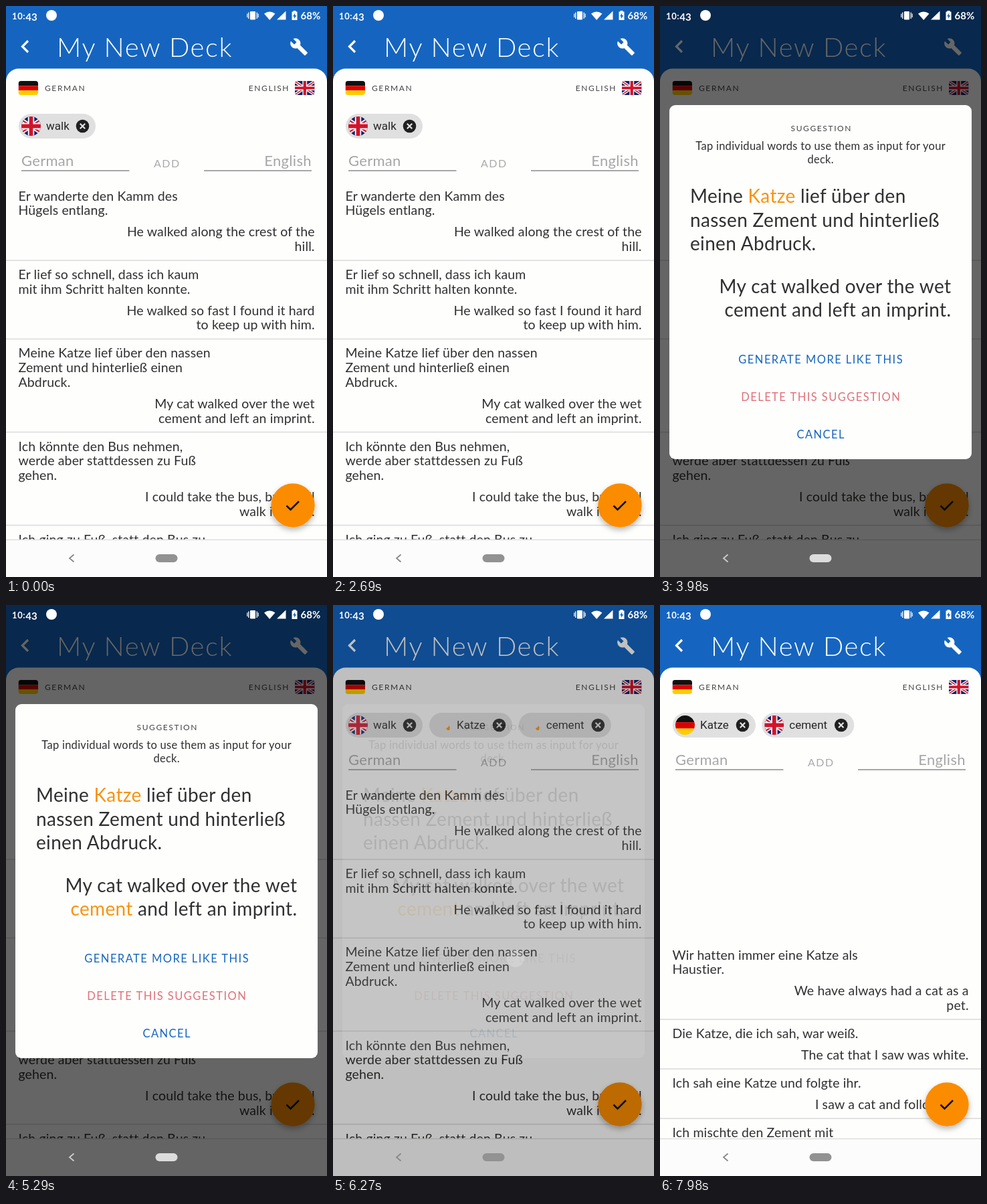
An HTML page for the animation above (8000 ms loop, 480x853 px).

```html
<!DOCTYPE html>
<html lang="en">
<head>
<meta charset="utf-8">
<title>Deck suggestions</title>
<style>
html, body { margin: 0; width: 100%; height: 100%; overflow: hidden; background: #1565c0; }
svg { display: block; }
#stage { width: 100vw; height: 100vh; }
text { font-family: Lato, "Open Sans", sans-serif; white-space: pre; }
.chip { font-family: Roboto, sans-serif; }
</style>
</head>
<body>
<svg id="stage" viewBox="0 0 480 853" xmlns="http://www.w3.org/2000/svg"></svg>
<script>
const LOOP = 8000;
const BLUE = '#1565c0', ORANGE = '#fb8c00', INK = '#303030', PAPER = '#fefefd';

// ---- drawing helpers ----
// size, letter spacing, weight
const styles = {
  title: [40, 1.6, 300], body: [19.5, 0.14], hint: [22, 0.3], add: [16, 1.5],
  label: [12, 1.6], lead: [16.5, 0.27], big: [28, 0.32], button: [16.5, 1.45]
};

function text(str, x, y, style, fill = INK, anchor = 'start', extra = '') {
  const [size, gap, weight = 400] = styles[style];
  const shift = { start: 0, middle: gap / 2, end: gap }[anchor];
  return `<text x="${x + shift}" y="${y}" font-size="${size}" letter-spacing="${gap}"
    font-weight="${weight}" fill="${fill}" text-anchor="${anchor}" ${extra}>${str}</text>`;
}

const rect = (x, y, w, h, fill, r = 0, extra = '') =>
  `<rect x="${x}" y="${y}" width="${w}" height="${h}" rx="${r}" fill="${fill}" ${extra}/>`;

const line = (d, color, width, extra = '') =>
  `<path d="${d}" fill="none" stroke="${color}" stroke-width="${width}" ${extra}/>`;

const flagArt = {
  de: rect(0, 0, 60, 14, '#111') + rect(0, 14, 60, 13, '#dd0000') + rect(0, 27, 60, 13, '#ffce00'),
  uk: rect(0, 0, 60, 40, '#10246b') +
    line('M0 0L60 40M60 0L0 40', '#fff', 8) + line('M0 0L60 40M60 0L0 40', '#d0142c', 3) +
    line('M30 0V40M0 20H60', '#fff', 13) + line('M30 0V40M0 20H60', '#d0142c', 8)
};

let clips = 0;
function flag(kind, x, y, w, h, r) {
  const id = 'clip' + clips++;
  return `<clipPath id="${id}">${rect(x, y, w, h, '#000', r)}</clipPath>
    <g clip-path="url(#${id})"><svg x="${x}" y="${y}" width="${w}" height="${h}"
    viewBox="0 0 60 40" preserveAspectRatio="xMidYMid slice">${flagArt[kind]}</svg></g>`;
}

function chip(id, kind, word, width) {
  const cx = width - 19.5;
  return `<g id="${id}">${rect(0, 161, width, 37, '#e0e0e0', 18.5)}
    <path id="${id}Spark" d="M25 184l3-1 1-3 2 3-1 4h-3z" fill="${ORANGE}"/>
    <g id="${id}Flag">${flag(kind, 4, 165, 29, 29, 14.5)}</g>
    <text class="chip" x="41" y="185" font-size="17" fill="#262626">${word}</text>
    <circle cx="${cx}" cy="179.5" r="9.8" fill="#202020"/>
    ${line(`M${cx - 3.7} 175.8l7.4 7.4m0-7.4l-7.4 7.4`, '#e6e6e6', 2.1)}</g>`;
}

// Rows stack: left lines, then right lines, then a divider.
function list(rows) {
  const pitch = 21.7;
  let top = 262.6, out = '';
  for (const [left, right] of rows) {
    let y = top + 28;
    left.forEach((s, i) => out += text(s, 18.5, y + i * pitch, 'body'));
    y += (left.length - 1) * pitch + 32;
    right.forEach((s, i) => out += text(s, 461.5, y + i * pitch, 'body', INK, 'end'));
    top += 74 + (left.length + right.length - 2) * pitch;
    out += rect(0, top - 0.8, 480, 1.7, '#dedede');
  }
  return out;
}

const firstRows = [
  [['Er wanderte den Kamm des', 'Hügels entlang.'], ['He walked along the crest of the', 'hill.']],
  [['Er lief so schnell, dass ich kaum', 'mit ihm Schritt halten konnte.'],
   ['He walked so fast I found it hard', 'to keep up with him.']],
  [['Meine Katze lief über den nassen', 'Zement und hinterließ einen', 'Abdruck.'],
   ['My cat walked over the wet', 'cement and left an imprint.']],
  [['Ich könnte den Bus nehmen,', 'werde aber stattdessen zu Fuß', 'gehen.'],
   ['I could take the bus, but I will', 'walk instead.']],
  [['Ich ging zu Fuß, statt den Bus zu', 'nehmen.'], ['I walked instead of taking the bus.']]
];
const nextRows = [
  [['Wir hatten immer eine Katze als', 'Haustier.'], ['We have always had a cat as a', 'pet.']],
  [['Die Katze, die ich sah, war weiß.'], ['The cat that I saw was white.']],
  [['Ich sah eine Katze und folgte ihr.'], ['I saw a cat and followed it.']],
  [['Ich mischte den Zement mit', 'Wasser.'], ['I mixed the cement with water.']]
];

// ---- scene ----
const wrench = 'M22.7 19l-9.1-9.1c.9-2.3.4-5-1.5-6.9-2-2-5-2.4-7.4-1.3L9 6 6 9 1.6 4.7C.4 7.1.9 10.1 2.9 12.1c1.9 1.9 4.6 2.4 6.9 1.5l9.1 9.1c.4.4 1 .4 1.4 0l2.3-2.3c.5-.4.5-1.1.1-1.4z';

const header = rect(0, 0, 480, 853, BLUE) +
  line('M33 52L24.5 60.5L33 69', '#fff', 3.2) +
  text('My New Deck', 76, 76, 'title', '#fff') +
  `<path transform="translate(424 47) scale(1.17)" d="${wrench}" fill="#fff"/>` +
  rect(0, 93.5, 480, 800, PAPER, 19);

const form = flag('de', 18.5, 112, 29.5, 21, 4) + text('GERMAN', 58, 126.5, 'label', '#444') +
  text('ENGLISH', 422.5, 126.5, 'label', '#444', 'end') + flag('uk', 432, 112, 29.5, 21, 4) +
  chip('walk', 'uk', 'walk', 115) + chip('katze', 'de', 'Katze', 124) + chip('cement', 'uk', 'cement', 138) +
  text('German', 23, 238.5, 'hint', '#a6a6a6') + text('English', 456.5, 238.5, 'hint', '#a6a6a6', 'end') +
  rect(23, 245.3, 161.5, 1.4, '#858585') + rect(296, 245.3, 161, 1.4, '#858585') +
  text('ADD', 240, 241, 'add', '#aaa', 'middle');

const fab = `<circle cx="429" cy="746" r="32.7" fill="${ORANGE}" filter="url(#shade)"/>` +
  line('M419.5 746.5L425.5 752.5L438 740', '#111', 2.6);

const dialog = rect(14, 148, 452, 529, PAPER, 9) +
  text('SUGGESTION', 240.5, 187, 'label', '#444', 'middle') +
  text('Tap individual words to use them as input for your', 240, 215, 'lead', INK, 'middle') +
  text('deck.', 240, 234.5, 'lead', INK, 'middle') +
  text('Meine <tspan id="word1">Katze</tspan> lief über den', 45, 294, 'big') +
  text('nassen Zement und hinterließ', 45, 329.6, 'big') +
  text('einen Abdruck.', 45, 365, 'big') +
  text('My cat walked over the wet', 435, 428.8, 'big', INK, 'end') +
  text('<tspan id="word2">cement</tspan> and left an imprint.', 435, 464.4, 'big', INK, 'end') +
  text('GENERATE MORE LIKE THIS', 240, 533.8, 'button', '#aaa', 'middle', 'id="more"') +
  text('DELETE THIS SUGGESTION', 240, 589.8, 'button', '#e07078', 'middle') +
  text('CANCEL', 240, 645.8, 'button', BLUE, 'middle');

const statusBar = `<g fill="#fff" font-weight="700">
  <text x="9" y="20" font-size="15"><tspan font-size="13" letter-spacing=".6">10:</tspan><tspan dy="2">43</tspan></text>
  <circle cx="68" cy="14" r="8"/>
  ${rect(365, 8, 8, 12.5, '#fff', 1)}
  ${line('M362.8 9.5V19M375.2 9.5V19', '#fff', 1.3)}${line('M360.8 11.5V17M377.2 11.5V17', '#fff', 1.2)}
  <path d="M386 11.5Q394 5.5 402.5 11.5L394.2 21Z"/>
  <path d="M405 20.5L418.5 7.5V20.5Z"/>
  <path d="M429.5 8.5V7H433.5V8.5H435.5V21H427.5V8.5Z"/>
  <path d="M432.3 10.5L429 15.5H431V19L434.2 14H432.2Z" fill="${BLUE}"/>
  <text x="440.5" y="20" font-size="15">68%</text></g>`;

const stage = document.getElementById('stage');
stage.innerHTML = `<defs>
  <filter id="shade" x="-30%" y="-30%" width="160%" height="170%">
    <feDropShadow dx="0" dy="4" stdDeviation="4" flood-color="#000" flood-opacity=".28"/></filter>
  <clipPath id="listBox">${rect(0, 255, 480, 542, '#000')}</clipPath>
  <clipPath id="rowBox">${rect(0, 497.4, 480, 139, '#000')}</clipPath></defs>
  ${header}${form}
  <g clip-path="url(#listBox)"><g id="first">${list(firstRows)}</g><g id="next">${list(nextRows)}</g>
    <circle id="ripple" cx="240" cy="566" clip-path="url(#rowBox)"/></g>
  ${fab}
  ${rect(0, 797, 480, 56, '#fcfcfc')}${rect(0, 796.7, 480, 1.4, '#dcdcdc')}
  ${rect(0, 0, 480, 853, '#000', 0, 'id="dim"')}
  <g id="dialog">${dialog}</g>
  <circle id="tap" cx="273" cy="528" r="13" fill="#fff"/>
  ${rect(223.5, 819, 33, 12, '#929292', 6, 'id="pill"')}
  ${line('M101.5 819.5L95 825L101.5 830.5', '#858585', 1.7, 'id="navBack"')}
  ${statusBar}`;

// ---- motion ----
const el = {};
stage.querySelectorAll('[id]').forEach(n => el[n.id] = n);
const set = (id, name, value) => el[id].setAttribute(name, value);
const fade = (id, value) => set(id, 'opacity', value);
const move = (id, x, y = 0) => set(id, 'transform', `translate(${x} ${y})`);

const part = (t, a, b) => Math.min(1, Math.max(0, (t - a) / (b - a)));
const mix = (a, b, u) => a + (b - a) * u;
const smooth = u => u * u * (3 - 2 * u);
const easeOut = u => Math.sin(u * Math.PI / 2);

function blend(a, b, u) {
  return `rgb(${a.map((v, i) => Math.round(mix(v, b[i], u)))})`;
}

// Interpolates between [time, value] pairs.
function keys(t, list) {
  for (let i = 1; i < list.length; i++) {
    const [a, va] = list[i - 1], [b, vb] = list[i];
    if (t < b) return mix(va, vb, smooth(part(t, a, b)));
  }
  return list[list.length - 1][1];
}

function pressWord(id, t, a, b) {
  const mid = mix(a, b, 0.45);
  set(id, 'fill', t < mid ? INK : '#f9920f');
  set(id, 'fill-opacity', t < mid ? mix(1, 0.3, part(t, a, mid)) : mix(0.3, 1, part(t, mid, b)));
}

function update(t) {
  // pressed row and dialog
  set('ripple', 'r', 262 * easeOut(part(t, 2700, 3060)));
  fade('ripple', 0.15 * part(t, 2700, 2780) * (1 - part(t, 3000, 3220)));
  const left = 1 - part(t, 6100, 6400);
  fade('dim', 0.6 * easeOut(part(t, 2780, 3310)) * Math.pow(left, 1.05));
  fade('dialog', part(t, 2770, 2860) * Math.pow(left, 2.7));
  move('dialog', 0, keys(t, [[2770, 700], [2940, -25], [3010, 8], [3110, -4], [3220, 0]]));
  fade('tap', t < 6080 ? 0 : 0.22 * (1 - part(t, 6270, 6350)));

  pressWord('word1', t, 3710, 3980);
  pressWord('word2', t, 4730, 5060);
  const ready = part(t, 3830, 3980) * (1 - part(t, 6080, 6200));
  set('more', 'fill', blend([170, 170, 170], [21, 101, 192], ready));

  const modal = t > 2800 && t < 6180;
  set('pill', 'fill', modal ? '#dcdcdc' : '#929292');
  set('navBack', 'stroke', modal ? '#d0d0d0' : '#858585');

  // chips
  const shift = smooth(part(t, 7560, 7780));
  move('walk', 19);
  move('katze', mix(144, 19, shift));
  move('cement', mix(277.8, 152.3, shift));
  fade('walk', 1 - part(t, 7540, 7660));
  fade('walkSpark', 0);
  const grown = part(t, 6290, 6390);
  for (const id of ['katze', 'cement']) {
    fade(id, t < 6090 ? 0 : 1);
    fade(id + 'Spark', 1 - grown);
    fade(id + 'Flag', grown);
  }

  // lists
  fade('first', 1 - part(t, 7540, 7680));
  fade('next', t < 7640 ? 0 : 1);
  move('next', 0, mix(535, 239, part(t, 7640, 7980)));
}

const start = performance.now();
function tick() {
  update((performance.now() - start) % LOOP);
  requestAnimationFrame(tick);
}
update(0);
requestAnimationFrame(tick);
</script>
</body>
</html>
```
